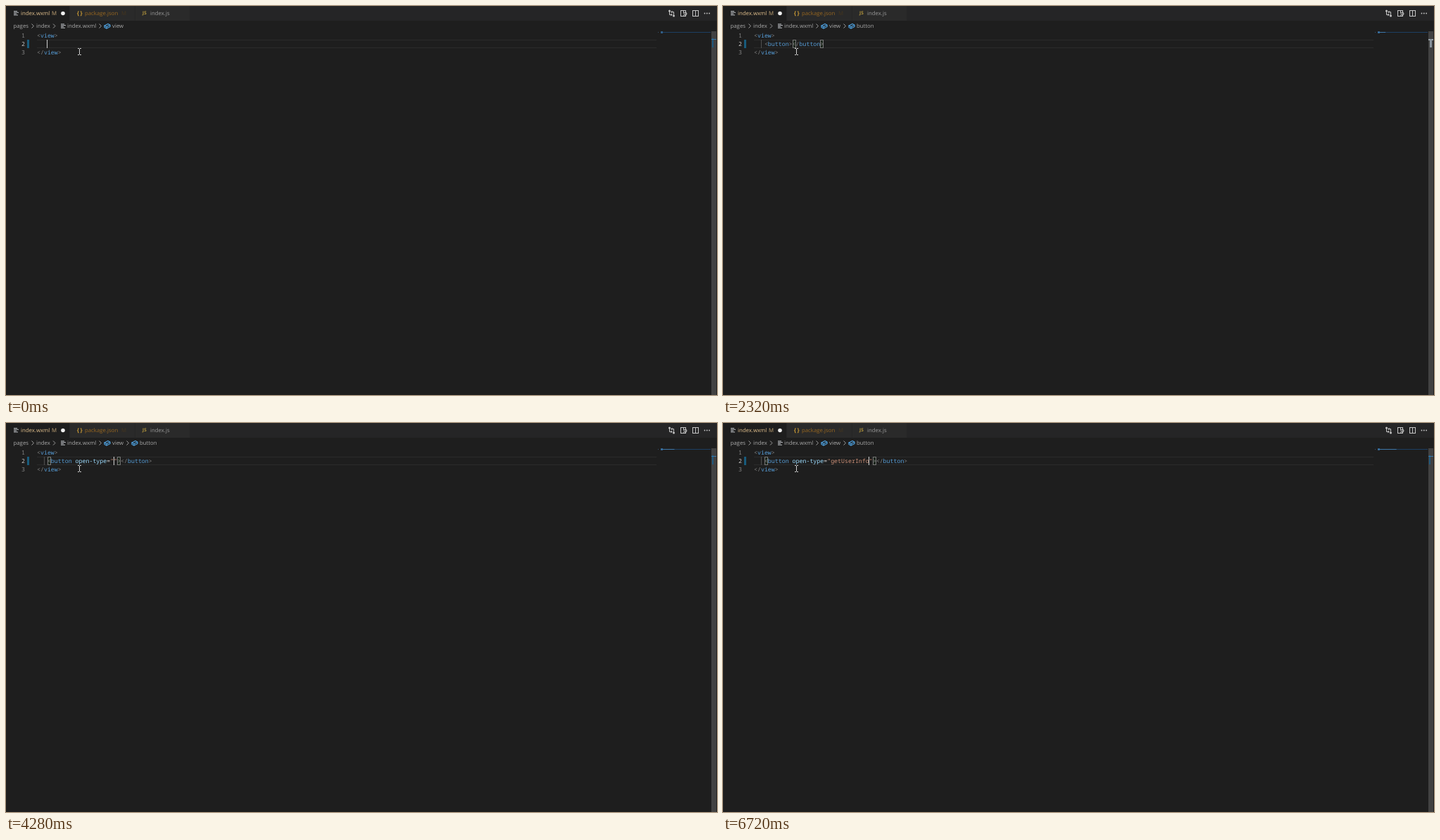
These frames come from a looping animation (1011 px wide and 554 px high, 7.12 s). An HTML page with a canvas:

```html
<!DOCTYPE html>
<html lang="zh">
<head>
<meta charset="utf-8">
<title>Editor completion</title>
<style>
  html, body { margin: 0; width: 100%; height: 100%; overflow: hidden; background: #1e1e1e; }
  canvas { display: block; }
</style>
</head>
<body>
<canvas id="stage" width="1011" height="554"></canvas>
<script>
const ctx = document.getElementById('stage').getContext('2d');
const LOOP = 7120, BLINK = 490;
const CHAR = 4.962, LEFT = 44, LINE = 12.2, ROW = 12.27, INDENT = 3;
const MONO = '8.27px "Noto Sans Mono", "DejaVu Sans Mono", monospace';
const UI = '7.8px "Open Sans", "Noto Sans", sans-serif';
const DOC = '9px "Open Sans", "Noto Sans CJK SC", "Noto Sans CJK", sans-serif';

// ---- story -------------------------------------------------------------
const TAGS = ['ad', 'audio', 'block', 'button', 'camera', 'canvas', 'checkbox',
  'checkbox-group', 'cover-image', 'cover-view', 'form', 'icon'];
const B_TAGS = ['block', 'button', 'checkbox', 'feBlend', 'feGaussianBlur', 'scroll-view'];
const TYPES = ['contact', 'feedback', 'getPhoneNumber', 'getUserInfo', 'launchApp', 'openSetting', 'share'];
const TYPE_DOCS = [
  ['打开客服会话，如果用户在会话中点击消息卡片', '后返回小程序，可以从 bindcontact 回调中获得', '具体信息，具体说明 （小程序插件中不能使', '用）'],
  ['打开“意见反馈”页面，用户可提交反馈内', '容并上传日志，具体说明 （小程序插件中', '不能使用）'],
  ['获取用户手机号，可以从bindgetphonenumber', '回调中获取到用户信息，具体说明 （小程序插', '件中不能使用）'],
  ['获取用户信息，可以从bindgetuserinfo', '回调中获取到用户信息，具体说明 （小程序插', '件中不能使用）']
];
const list = (rows, query, icon, doc, sel = 0) => ({ rows, query, icon, doc, sel });
const types = sel => list(TYPES, '', 'enum', TYPE_DOCS[sel], sel);

const OPEN = '<button open-type="';
// at: start, code: line 2, col: caret, edit: caret blink restarts, pair: boxed columns
const STEPS = [
  { at: 0, code: '', col: 0, edit: 0, crumb: '' },
  { at: 80, code: '<', col: 1, edit: 80, crumb: '' },
  { at: 160, code: '<', col: 1, edit: 80, crumb: '?', popup: list(TAGS, '', 'wrench', ['广告']) },
  { at: 270, code: '<b', col: 2, edit: 270, crumb: '?', popup: list(B_TAGS, 'b', 'wrench', ['块']) },
  { at: 360, code: '<bu', col: 3, edit: 360, crumb: '?', popup: list(['button', 'feGaussianBlur'], 'bu', 'wrench', ['按钮']) },
  { at: 1160, code: '<button', col: 7, edit: 1150, crumb: 'button' },
  { at: 1800, code: '<button></button>', col: 8, edit: 1790, crumb: 'button', pair: [8, 16], white: true },
  { at: 2600, code: '<button></button>', col: 7, edit: 2600, crumb: 'button', pair: [0, 7], white: true },
  { at: 2960, code: '<button ></button>', col: 8, edit: 2960, crumb: 'button', pair: [0, 8], white: true },
  { at: 3440, code: '<button o></button>', col: 9, edit: 3430, crumb: 'button', pair: [0, 9], white: true },
  { at: 3520, code: '<button o></button>', col: 9, edit: 3430, crumb: 'button', pair: [0, 9], white: true,
    popup: list(['open-type', 'aria-orientation'], 'o', 'attr', ['墨铃开放能力']) },
  { at: 4280, code: OPEN + '"></button>', col: 19, edit: 4270, crumb: 'button', pair: [0, 20] },
  { at: 4360, code: OPEN + '"></button>', col: 19, edit: 4270, crumb: 'button', pair: [0, 20], popup: types(0) },
  { at: 5000, code: OPEN + '"></button>', col: 19, edit: 4270, crumb: 'button', pair: [0, 20], popup: types(1) },
  { at: 5400, code: OPEN + '"></button>', col: 19, edit: 4270, crumb: 'button', pair: [0, 20], popup: types(2) },
  { at: 5920, code: OPEN + '"></button>', col: 19, edit: 4270, crumb: 'button', pair: [0, 20], popup: types(3) },
  { at: 6480, code: OPEN + 'getUserInfo"></button>', col: 30, edit: 6480, steady: true, crumb: 'button', pair: [0, 31] }
];

// ---- helpers -----------------------------------------------------------
function rect(x, y, w, h, color) {
  ctx.fillStyle = color;
  ctx.fillRect(x, y, w, h);
}
function frame(x, y, w, h, color) {
  ctx.strokeStyle = color;
  ctx.lineWidth = 1;
  ctx.strokeRect(x + .5, y + .5, w - 1, h - 1);
}
function text(s, x, y, color, font = UI) {
  ctx.font = font;
  ctx.fillStyle = color;
  ctx.fillText(s, x, y);
}
// Each path is a flat list: x, y, x, y ...
function lines(color, width, ...paths) {
  ctx.strokeStyle = color;
  ctx.lineWidth = width;
  ctx.beginPath();
  for (const p of paths)
    for (let i = 0; i < p.length; i += 2) ctx[i ? 'lineTo' : 'moveTo'](p[i], p[i + 1]);
  ctx.stroke();
}
function circle(x, y, r, color) {
  ctx.fillStyle = color;
  ctx.beginPath();
  ctx.arc(x, y, r, 0, 7);
  ctx.fill();
}

// ---- icons -------------------------------------------------------------
function fileIcon(x, y) {
  [5, 7, 4, 6].forEach((w, i) => rect(x, y + i * 1.8, w, 1, '#b8bcc0'));
}
function chevron(x) {
  lines('#a0a0a0', 1, [x - 1.5, 25.5, x + 1.5, 28.5, x - 1.5, 31.5]);
}
function cube(x) {
  const y = 28.5;
  lines('#4d9edb', 1.2,
    [x - 4, y - .5, x + 1, y - 3, x + 4, y - 1.5, x + 4, y + 1, x - 1, y + 3.5, x - 4, y + 2, x - 4, y - .5, x - 1, y + 1, x + 4, y - 1.5],
    [x - 1, y + 1, x - 1, y + 3.5]);
}
const ROW_ICONS = {
  wrench(x, y, c) {
    lines(c, 1.8, [x - 3.5, y + 3.5, x + .7, y - .7]);
    ctx.lineWidth = 1.4;
    ctx.beginPath();
    ctx.arc(x + 1.8, y - 1.6, 2.1, 0, 4.8);
    ctx.stroke();
  },
  attr(x, y, c, selected) {
    frame(x - 1, y - 3, 6, 5, selected ? '#c8dcec' : '#b98036');
    rect(x - 4, y, 4, 3, selected ? '#c8dcec' : '#b98036');
    rect(x + 1, y - 1, 2, 1, c);
  },
  enum(x, y, c) {
    frame(x - 3, y - 4, 6, 9, c);
    rect(x - 1, y - 2, 2, 1, c);
    rect(x - 1, y, 2, 1, c);
    rect(x - 1, y + 2, 2, 1, c);
  }
};

// ---- editor chrome -----------------------------------------------------
function drawTabs() {
  rect(0, 0, 1011, 21, '#252526');
  rect(0, 0, 90, 21, '#1e1e1e');
  rect(91, 0, 92, 21, '#2a2a2a');
  rect(184, 0, 77, 21, '#2a2a2a');
  fileIcon(11, 7);
  text('index.wxml', 21, 13.3, '#e2c08d');
  text('M', 65, 13.3, '#c4a677');
  circle(81, 10.5, 2.8, '#f0f0f0');
  text('{}', 100, 12.7, '#c99a35', 'bold 8px "Noto Sans Mono", monospace');
  text('package.json', 112, 13.3, '#986720');
  text('M', 164, 13.3, '#46361f');
  text('JS', 194, 12.3, '#b3963c', 'bold 6.5px "Open Sans", sans-serif');
  text('index.js', 205, 13.3, '#999999');

  const c = '#c5c5c5';
  lines(c, 1, [943.5, 7, 943.5, 12.5, 947, 12.5], [945.5, 10.8, 947.2, 12.5, 945.5, 14.2],
    [949.5, 14, 949.5, 8.5, 946, 8.5], [947.5, 6.8, 945.8, 8.5, 947.5, 10.2]);
  circle(943.5, 7, 1.5, c);
  circle(949.5, 14, 1.5, c);
  frame(959, 6, 8, 9, c);
  lines(c, 1, [963.5, 6, 963.5, 10]);
  ctx.beginPath();
  ctx.arc(966, 11, 2, 0, 7);
  ctx.stroke();
  lines(c, 1, [964.5, 12.5, 962.5, 15]);
  frame(976, 6, 9, 9, c);
  lines(c, 1, [980.5, 6, 980.5, 15]);
  for (let i = 0; i < 3; i++) circle(993.5 + i * 3.3, 10.5, .9, c);
}
function drawCrumbs(last) {
  const c = '#a9a9a9', y = 31.3;
  text('pages', 10.5, y, c);
  chevron(38);
  text('index', 43, y, c);
  chevron(68.5);
  fileIcon(78, 25.3);
  text('index.wxml', 87, y, c);
  chevron(134);
  cube(144);
  text('view', 151, y, c);
  if (!last) return;
  chevron(173);
  cube(183);
  text(last, 190, y, c);
}
function drawMargins(step) {
  rect(927, 37, 1, 1, '#35506b');
  rect(931, 37, 71, 1, '#1d3f63');
  rect(931, 36, 3, 3, '#315d85');
  rect(931, 37, step.code.length * .65, 1, '#3d78ab');
  rect(1003, 36, 7, 518, '#424242');
  if (step.white) {
    rect(1003, 47, 7, 2, '#9aa3aa');
    rect(1005, 47, 3, 12, '#8a949c');
  } else {
    rect(1004, 46, 2, 13, '#1f587c');
    rect(1003, 47, 7, 1, '#3b7aab');
  }
}

// ---- code --------------------------------------------------------------
const baseline = row => 45 + row * LINE;
const codeX = col => LEFT + (INDENT + col) * CHAR;

function drawCode(code, x, y) {
  let inTag = false;
  for (const m of code.matchAll(/<\/?|>|"[^"]*"|=|[\w-]+/g)) {
    const s = m[0];
    let color = '#808080';
    if (s[0] === '<') inTag = true;
    else if (s[0] === '"') color = '#ce9178';
    else if (s === '=') color = '#d4d4d4';
    else if (s !== '>') {
      color = inTag ? '#569cd6' : '#9cdcfe';
      inTag = false;
    }
    text(s, x + m.index * CHAR, y, color, MONO);
  }
}
function drawEditor(step, t) {
  rect(LEFT, 48, 881, 1, '#2b2b2b');
  rect(LEFT, 59, 881, 1, '#2b2b2b');
  rect(30, 48, 3, 12, '#185b7c');
  for (let i = 0; i < 3; i++)
    text(String(i + 1), 22, baseline(i), i === 1 ? '#c6c6c6' : '#858585', MONO);
  if (step.code) rect(54, 48, 1, 12, '#505050');
  for (const col of step.pair || []) {
    const x = Math.round(codeX(col));
    rect(x, 48, 5, 12, 'rgba(0,100,0,.1)');
    frame(x, 48, 5, 12, '#777777');
  }
  drawCode('<view>', LEFT, baseline(0));
  drawCode(step.code, codeX(0), baseline(1));
  drawCode('</view>', LEFT, baseline(2));
  if (step.steady || Math.floor((t - step.edit) / BLINK) % 2 === 0)
    rect(Math.round(codeX(step.col) - .6), 48, 1, 12, '#d0d0d0');
}

// ---- completion --------------------------------------------------------
function drawRow(label, query, x, y, selected) {
  const font = selected ? 'bold ' + MONO : '500 ' + MONO;
  let q = 0;
  [...label].forEach((ch, i) => {
    const hit = q < query.length && ch.toLowerCase() === query[q];
    if (hit) q++;
    if (hit && selected) return; // matched letters sink into the highlight
    text(ch, x + i * CHAR, y, hit ? '#206796' : selected ? '#ffffff' : '#d4d4d4', font);
  });
}
function drawPopup(p, col) {
  const x = Math.round(codeX(col) - .5), y = 60, w = 576;
  const h = Math.round(p.rows.length * ROW + 2.4);
  rect(x, y, w, h, '#252526');
  rect(x + 1, y + 1 + Math.round(p.sel * ROW), w - 2, 12, '#04426f');
  frame(x, y, w, h, '#454545');
  p.rows.forEach((label, i) => {
    const mid = y + 7 + i * ROW, selected = i === p.sel;
    ROW_ICONS[p.icon](x + 7, Math.round(mid), selected ? '#ffffff' : '#c5c5c5', selected);
    drawRow(label, p.query, x + 14.7, mid + 2.7, selected);
  });

  const dx = x + w - 1, dw = 214;
  const dh = Math.max(26, Math.round(p.doc.length * LINE + 6.3));
  rect(dx, y, dw, dh, '#252526');
  frame(dx, y, dw, dh, '#454545');
  p.doc.forEach((s, i) => text(s, dx + 3.7, 73 + i * LINE, '#cccccc', DOC));
  const cx = dx + dw - 8, cy = 69;
  lines('#c5c5c5', 1, [cx - 2.5, cy - 2.5, cx + 2.5, cy + 2.5], [cx + 2.5, cy - 2.5, cx - 2.5, cy + 2.5]);
}
function drawMouse() {
  rect(104, 61, 1, 8, '#d0d0d0');
  rect(102, 60, 2, 1, '#d0d0d0');
  rect(105, 60, 2, 1, '#d0d0d0');
  rect(102, 69, 2, 1, '#d0d0d0');
  rect(105, 69, 2, 1, '#d0d0d0');
}

function draw(t) {
  const step = STEPS.findLast(s => s.at <= t);
  rect(0, 0, 1011, 554, '#1e1e1e');
  drawTabs();
  drawCrumbs(step.crumb);
  drawMargins(step);
  drawEditor(step, t);
  if (step.popup) drawPopup(step.popup, step.col);
  drawMouse();
}

ctx.textRendering = 'geometricPrecision';
const start = performance.now();
function tick() {
  draw((performance.now() - start) % LOOP);
  requestAnimationFrame(tick);
}
tick();
</script>
</body>
</html>
```
